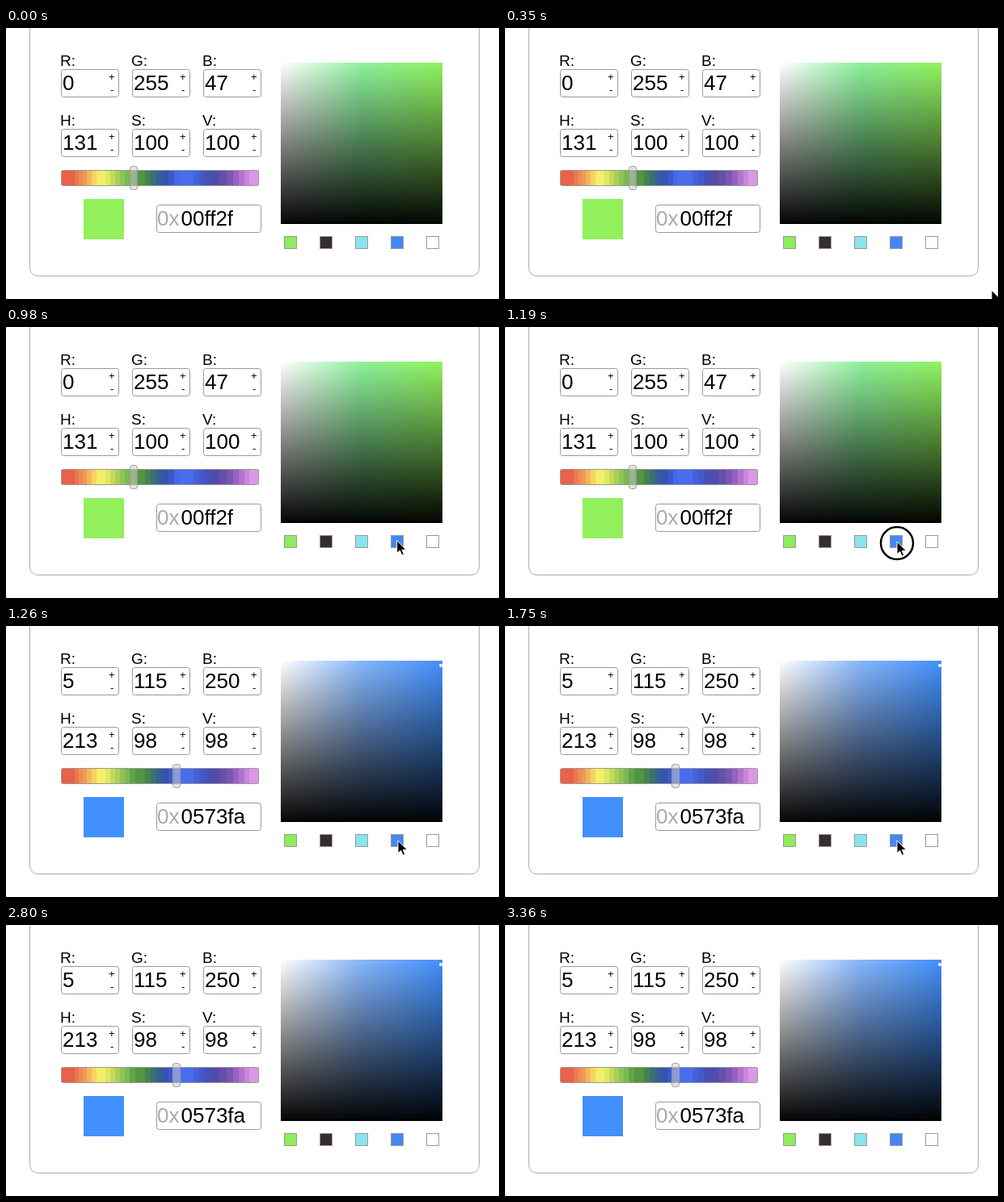
Recreate the animation shown at these times as an HTML page. Size 610 px wide and 336 px high, loop 3500 ms.

```html
<!DOCTYPE html>
<html lang="en">
<head>
<meta charset="utf-8">
<title>Color picker</title>
<style>
  html, body { margin: 0; width: 610px; height: 336px; overflow: hidden; background: #ccc; }
  svg { display: block; }
  text { font: 26px "Liberation Sans", Arial, sans-serif; fill: #000; }
  .label { font-size: 19px; }
  .sign { font-size: 13px; }
  .box { fill: #fff; stroke: #999; }
</style>
</head>
<body>
<svg id="stage" width="610" height="336">
  <defs>
    <linearGradient id="tint">
      <stop stop-color="#fff"/><stop id="mid" offset=".5"/><stop id="full" offset="1"/>
    </linearGradient>
    <linearGradient id="shade" x2="0" y2="1">
      <stop stop-opacity="0"/><stop offset=".98" stop-opacity=".96"/><stop offset="1"/>
    </linearGradient>
    <clipPath id="barClip"><rect x="68" y="177" width="245" height="18" rx="2"/></clipPath>
  </defs>
  <rect width="610" height="336" rx="3" fill="#fff"/>
  <rect x="29.5" y="-20" width="556" height="327.5" rx="10" fill="none" stroke="#aaa"/>
  <g id="fields"></g>
  <g id="bar" clip-path="url(#barClip)"></g>
  <rect x="68.5" y="176.5" width="244" height="19" rx="2" fill="none" stroke="#999"/>
  <rect id="handle" y="171.5" width="9" height="29" rx="3" fill="#ccc" fill-opacity=".5" stroke="#999"/>
  <rect id="swatch" x="96" y="212" width="50" height="50"/>
  <rect class="box" x="186.5" y="219.5" width="129" height="34" rx="3"/>
  <text x="187" y="245" style="fill:#aaa">0x</text>
  <text id="hex" x="216.5" y="245"></text>
  <rect x="340" y="43" width="200" height="200" fill="url(#tint)"/>
  <rect x="340" y="43" width="200" height="200" fill="url(#shade)"/>
  <circle id="marker" cx="538" cy="49" r="2" fill="#fff"/>
  <g id="presets"></g>
  <circle id="ring" cx="485" cy="268" fill="none" stroke="#000" stroke-width="2.5"/>
  <path id="cursor" d="M0 0V15.7L3.6 12.4 6.1 18.2 8.7 17.1 6.3 11.5H11.3Z" stroke="#fff"/>
</svg>
<script>
const $ = id => document.getElementById(id);
const LOOP = 3500, STEP = 70;

const colors = {
  green: { values: [0, 255, 47, 131, 100, 100], hex: '00ff2f', handle: 153.5,
           fill: '#92f05c', mid: '#8cf29c', full: '#92f35c' },
  blue:  { values: [5, 115, 250, 213, 98, 98], hex: '0573fa', handle: 206.5,
           fill: '#4290fb', mid: '#86b6fb', full: '#4290fb' }
};

$('fields').innerHTML = [...'RGBHSV'].map((name, i) => {
  const x = 68 + i % 3 * 88, y = i < 3 ? 0 : 74;
  return `<text class="label" x="${x - 1}" y="${47 + y}">${name}:</text>
    <rect class="box" x="${x + .5}" y="${51.5 + y}" width="71" height="34" rx="3"/>
    <text class="value" x="${x + 2}" y="${77 + y}"></text>
    <text class="sign" x="${x + 59}" y="${65 + y}">+</text>
    <text class="sign" x="${x + 61}" y="${81 + y}">-</text>`;
}).join('');

// Each band runs from its x to the right edge and is covered by the next one.
const bands = `68 e86148,85 eb784c,90 ed8c50,95 ee9a56,100 f3b75e,106 f3d562,112 f4ee68,
  123 dfe762,129 c5da5c,135 a8cf58,141 8fc454,147 7ab950,153 64a348,160 529542,172 46814f,
  179 3d7072,186 355f96,193 3454ae,201 3b59ca,208 466ae4,214 486eee,232 4563d8,239 445aca,
  246 4751b8,254 524ca8,264 6450a8,273 7b56b2,281 9762c2,288 b173ce,295 c986da,301 dc98e4`;
$('bar').innerHTML = bands.split(',').map(band => {
  const [x, color] = band.trim().split(' ');
  return `<rect x="${x}" y="177" width="${313 - x}" height="18" fill="#${color}"/>`;
}).join('');

$('presets').innerHTML = ['#8fec5c', '#352d31', '#8be4ec', '#4289f5', '#fff'].map((color, i) =>
  `<rect x="${344.5 + i * 44}" y="258.5" width="15" height="15" fill="${color}" stroke="#999"/>`
).join('');

const valueTexts = document.querySelectorAll('.value');
let current;

function pick(color) {
  if (color === current) return;
  current = color;
  valueTexts.forEach((text, i) => text.textContent = color.values[i]);
  $('hex').textContent = color.hex;
  $('handle').setAttribute('x', color.handle);
  $('swatch').setAttribute('fill', color.fill);
  $('mid').setAttribute('stop-color', color.mid);
  $('full').setAttribute('stop-color', color.full);
  $('marker').style.display = color === colors.blue ? '' : 'none';
}

function cursorAt(t) {
  if (t < 840) { // glide in, slowing down
    const left = (840 - t) / 490;
    return [483 + 119 * left ** 2, 264 + 61 * left ** 1.5];
  }
  if (t < 1960) {
    const k = Math.min(1, Math.max(0, (t - 910) / 210));
    return [483 + 2 * k, 264 + 2 * k];
  }
  const k = ((t - 1960) / 420) ** 3; // leave, speeding up
  return [485 - 45 * k, 266 + 30 * k];
}

function draw(now) {
  const t = Math.floor(now % LOOP / STEP) * STEP;
  pick(t < 1260 ? colors.green : colors.blue);
  $('cursor').setAttribute('transform', `translate(${cursorAt(t)})`);
  const pressed = t > 980 && t < 1260;
  $('ring').setAttribute('r', pressed ? 20 * (t - 980) / 210 : 0);
  requestAnimationFrame(() => draw(performance.now() - start));
}

const start = performance.now();
draw(0);
</script>
</body>
</html>
```
